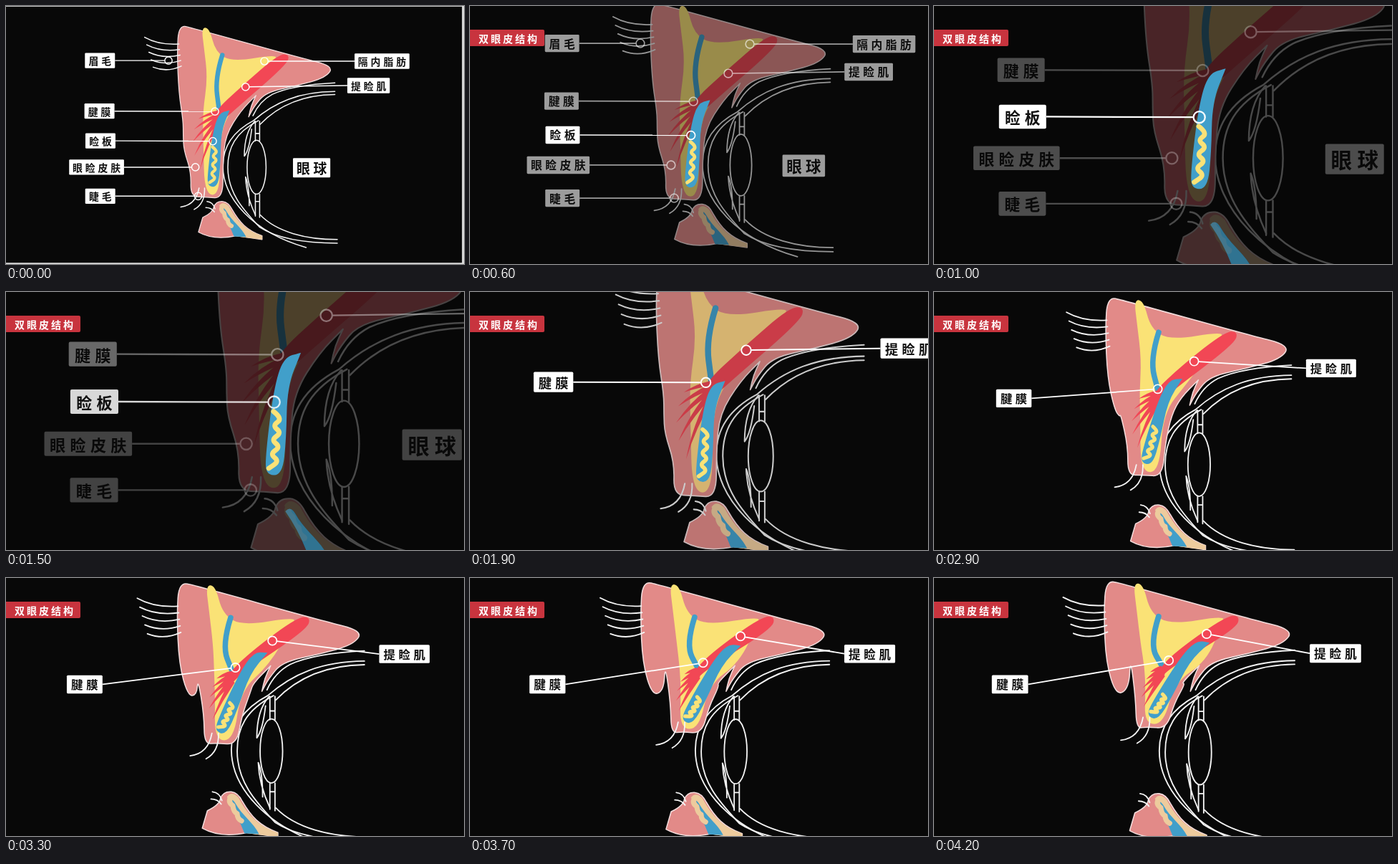
These frames come from a looping animation (640x360 px, 4.3 s). An HTML page:

```html
<!DOCTYPE html>
<html lang="zh">
<head>
<meta charset="utf-8">
<title>双眼皮结构</title>
<style>
  html, body { margin: 0; width: 100%; height: 100%; overflow: hidden; background: #ddd; }
  svg { display: block; width: 100vw; height: 100vh; }
  text { font-family: "Noto Sans CJK SC", "Noto Sans CJK", sans-serif; font-weight: 700; dominant-baseline: central; }
  .line { fill: none; stroke: #f4f4f4; stroke-width: 1.8; stroke-linecap: round; stroke-linejoin: round; }
  .skin { fill: #e28a88; stroke: #f3dede; stroke-width: 1.5; stroke-linejoin: round; }
  .blue { fill: #419fca; }
  .red { fill: #f24755; }
  .peach { fill: #edcb9d; }
  .round { fill: none; stroke-linecap: round; stroke-linejoin: round; }
</style>
</head>
<body>
<svg viewBox="0 0 640 360" preserveAspectRatio="none">
  <g id="world">
    <rect x="-70" y="-22" width="775.7" height="418" fill="#080808"/>

    <g class="line" transform="translate(1 0)">
      <path d="M497 102.5Q428 106 395 121Q374 132 363 156"/>
      <path d="M497 116.5C438 117 398 134 364 164C326 184 314 210 314 238C314 290 362 346 450 371"/>
      <path d="M497 121.5C446 122 406 138 375 170"/>
      <path d="M372 164C334 184 322 208 322 240C322 284 350 312 374 338C405 358 450 364 501 364"/>
      <path d="M375 318C402 346 450 358 501 358"/>
      <path d="M367 165V197M374 165V197M367 185H374M367 284V320M374 284V322M367 296H374"/>
      <path d="M366 165Q349 184 349 222Q357 212 361 178M351 256Q352 286 367 318M351 256Q357 270 357 303"/>
      <ellipse cx="369" cy="240" rx="15.5" ry="44"/>
    </g>

    <g transform="translate(2 0)">
      <path class="skin" d="M273 346L280 322Q297 314 298 305Q302 295 313 296Q322 297 328 309C340 330 352 343 377 352V358L335 352Q298 360 273 346Z"/>
      <path class="peach" d="M307 303Q313 294 323 304C337 331 353 344 377 352V358L335 353Z"/>
      <path id="lowBlue" class="blue" d="M308 309Q313 303 318 311C328 329 344 339 351 354L331 353Q322 329 308 309Z"/>
      <path class="round" stroke="#edcb9d" stroke-width="7" d="M312 304Q308 310 315 315Q316 324 321 326Q321 333 327 336"/>
      <path class="line" d="M287 296Q297 297 300 308M285 306Q294 306 299 313"/>
    </g>

    <path id="skin" class="skin"/>
    <path id="fat"/>
    <path id="band" class="round" stroke="#419fca" stroke-width="7.5"/>
    <path id="muscle" class="red"/>
    <path id="fibres" class="red"/>
    <path id="lashes" class="line" d="M276 274Q271 302 246 305M285 274Q286 299 268 309"/>
    <path id="brow" class="line"/>

    <rect id="dim" x="-70" y="-30" width="800" height="440" fill="#080808"/>
    <use id="glow" href="#lowBlue" x="2"/>
    <g id="plate">
      <path id="plateBody" class="blue"/>
      <path id="squiggle" class="round" stroke="#fbe277" stroke-width="5"/>
    </g>
    <g id="others"></g>
    <g id="tarsal"></g>
    <g id="pair"></g>
  </g>
  <g id="title">
    <rect x="-4" y="33" width="108" height="23" rx="2" fill="#c8343e"/>
    <text x="12" y="44.5" font-size="14" letter-spacing="3" fill="#fff">双眼皮结构</text>
  </g>
</svg>
<script>
const LOOP = 4300, STEP = 100;
const $ = id => document.getElementById(id);
const set = (el, attrs) => { for (const k in attrs) el.setAttribute(k, attrs[k]); return el; };
const add = (parent, tag, attrs) =>
  parent.appendChild(set(document.createElementNS('http://www.w3.org/2000/svg', tag), attrs));
const mix = (a, b, p) => a.map((v, i) => v + (b[i] - v) * p);
const rgb = c => `rgb(${c.map(Math.round)})`;
const linear = (t, from, to) => Math.min(1, Math.max(0, (t - from) / (to - from)));
const ramp = (t, from, to) => { const u = linear(t, from, to); return u * u * (3 - 2 * u); };

// Monotone curve through [time, value] keys
function track(keys) {
  const slope = i => (keys[i + 1][1] - keys[i][1]) / (keys[i + 1][0] - keys[i][0]);
  const tangent = i => {
    if (i === 0 || i === keys.length - 1) return 0;
    const a = slope(i - 1), b = slope(i);
    return a * b > 0 ? 2 * a * b / (a + b) : 0;
  };
  return t => {
    const i = keys.findIndex((k, n) => n < keys.length - 1 && t < keys[n + 1][0]);
    if (i < 0) return keys[keys.length - 1][1];
    const [t0, v0] = keys[i], [t1, v1] = keys[i + 1];
    const h = t1 - t0, u = (t - t0) / h, w = 1 - u;
    return v0 * w * w * (1 + 2 * u) + v1 * u * u * (1 + 2 * w)
      + h * u * w * (tangent(i) * w - tangent(i + 1) * u);
  };
}

// Quadratic spline; a repeated point makes a corner
function spline(pts, closed = true) {
  const n = pts.length, mid = i => mix(pts[i % n], pts[(i + 1) % n], 0.5);
  let d = 'M' + (closed ? mid(n - 1) : pts[0]);
  for (let i = closed ? 0 : 1; i < (closed ? n : n - 1); i++) d += 'Q' + pts[i] + ' ' + mid(i);
  return d + (closed ? 'Z' : 'L' + pts[n - 1]);
}

// Squashes tissue upwards as the lid opens, spreading it sideways from cx
const lifter = (p, cx, spread) => ([x, y]) => {
  const u = linear(y, 95, 285), bulge = Math.sin(Math.PI * Math.sqrt(u));
  return [x + p * (bulge * spread * (x - cx) + 10 * u), y - p * 83 * u];
};

const brow = [[243, 120], [240, 52], [243, 8], [266, 13], [440, 61], [496, 75], [483, 94], [436, 107],
  [385, 118], [366, 141], [357, 158], [357, 158], [361, 140], [369, 123], [369, 123], [345, 147]];
const lid = [[319, 188], [315, 235], [315, 291], [288, 289]];
const fat = [[280, 12], [293, 13], [303, 52], [330, 68], [403, 56], [400, 66], [335, 135], [309, 185],
  [311, 285], [285, 285], [283, 200], [282, 150], [290, 95], [284, 45]];
const muscle = [[406, 56], [424, 56], [419, 73], [330, 150], [304, 174], [297, 153], [350, 104]];
const band = [[314, 57], [302, 95], [309, 149]];
const plate = [[326, 147], [326, 147], [308, 152], [298, 185], [290, 250], [290, 272], [307, 272], [311, 235], [312, 182]];

function skinShape(p, lift) {
  const crease = (x, y, dx, dy) => [x + dx * p, y + dy * p];
  return [...brow, ...lid.map(lift), crease(262, 288, 22, -80), crease(263, 248, 20, -80),
    crease(251, 212, 25, -100), crease(250, 188, 24, -34), crease(250, 164, 7, 0)];
}

// A fan of tapered fibres below the muscle
function fibreShapes(lift) {
  let d = '';
  for (let i = 0; i < 5; i++) {
    const a = (162 - 12.5 * i) * Math.PI / 180, len = 36 + 12 * i, x = 309, y = 150 + 4 * i;
    const along = (k, bend) => lift([x + Math.cos(a + bend) * len * k, y + Math.sin(a + bend) * len * k]);
    const [bx, by] = lift([x, y]), [cx, cy] = along(0.5, 0.15), tip = along(1, 0);
    d += `M${bx - 2.5} ${by - 2.5}Q${cx - 2} ${cy - 2} ${tip}Q${cx + 2} ${cy + 2} ${bx + 2.5} ${by + 2.5}Z`;
  }
  return d;
}

function wave(p) {
  return Array.from({ length: 9 }, (_, i) =>
    [302 - i * 0.6 + (i % 2 ? 6 : -4), 265 - (58 - 30 * p) * (1 - i / 8)]);
}

function hairs() {
  let d = '';
  for (let i = 0; i < 5; i++) {
    const x = 187 + 3.5 * i, y = 28 + 12.2 * i;
    d += `M${x} ${y}Q${x + 23} ${y + 13 - i} ${243 + i} ${39 + 9 * i}`;
  }
  return d;
}

function label(group, text, x, y, from, to = from, size = 16.2) {
  const g = add($(group), 'g', {}), n = text.length, big = size > 20;
  const w = big ? 61 : n * 20.3 + 8.5, h = big ? 31.5 : 25, gap = big ? 5.5 : 4.6;
  const line = from && add(g, 'line', { stroke: '#fff', 'stroke-width': 1.7 });
  const ring = from && add(g, 'circle', { r: 6, fill: 'none', stroke: '#fff', 'stroke-width': 1.7 });
  add(g, 'rect', { x: x - w / 2, y: y - h / 2, width: w, height: h, rx: 1.5, fill: '#fff' });
  add(g, 'text', { x: x + gap / 2, y, 'font-size': size, 'letter-spacing': gap, 'text-anchor': 'middle', fill: '#111' })
    .textContent = text;
  return p => {
    if (!from) return;
    const [cx, cy] = mix(from, to, p), x1 = x + Math.sign(cx - x) * w / 2;
    const k = 6 / Math.hypot(cx - x1, cy - y);
    set(line, { x1, y1: y, x2: cx + (x1 - cx) * k, y2: cy + (y - cy) * k });
    set(ring, { cx, cy });
  };
}
const labels = [
  label('others', '眉毛', 114, 66, [226, 66]),
  label('others', '眼睑皮肤', 108.5, 240, [270, 240]),
  label('others', '睫毛', 114.5, 287.3, [274.5, 287.3]),
  label('others', '隔内脂肪', 575, 67, [382.8, 67]),
  label('others', '眼球', 460, 241, null, null, 22),
  label('tarsal', '睑板', 114.8, 197, [298.5, 197.5]),
  label('pair', '腱膜', 113.2, 148.5, [302, 149], [327.8, 116.3]),
  label('pair', '提睑肌', 553, 106.8, [352, 109], [379, 80.5])
];

// Time, scale, x, y
const shots = [
  [0, 0.855, 33.8, 19.7], [600, 0.976, 17.4, -12.3], [1000, 1.344, -30.5, -110.3],
  [1250, 1.367, -33.5, -116.3], [1500, 1.367, -33.5, -116.3], [1900, 1.128, -11.1, -41.8], [2400, 1, 0, 0]
];
const camera = [1, 2, 3].map(col => track(shots.map(s => [s[0], s[col]])));

function draw(t) {
  const p = 1 - (1 - linear(t, 2500, 4200)) ** 2;
  const soft = lifter(p, 265, 0.6), taut = lifter(p, 325, -0.5);
  const [s, x, y] = camera.map(f => f(t));
  const push = 1 + 0.034 * linear(t, 2500, 4200);
  const back = ramp(t, 1500, 1900), focus = ramp(t, 600, 1000);
  const shade = 0.4 * ramp(t, 200, 600) + 0.32 * focus - 0.55 * back - 0.17 * ramp(t, 1900, 2200);
  const hide = 1 - ramp(t, 1400, 1800), warm = focus - ramp(t, 1900, 2400);

  set($('world'), {
    transform: `translate(320 153) scale(${push}) translate(-320 -153) matrix(${s} 0 0 ${s} ${x} ${y})`
  });
  set($('skin'), {
    d: spline(skinShape(p, soft)),
    style: `fill:${rgb(mix([226, 138, 136], [245, 112, 122], focus - back))}`
  });
  set($('fat'), { d: spline(fat.map(soft)), fill: rgb(mix([250, 226, 118], [255, 214, 134], warm)) });
  set($('band'), { d: spline(band.map(taut), false) });
  set($('muscle'), { d: spline(muscle.map(taut)) });
  set($('fibres'), { d: fibreShapes(taut) });
  set($('lashes'), { transform: `translate(${17 * p} ${-81 * p})` });
  set($('brow'), { transform: `translate(${-2 * p} ${3 * p})` });
  set($('plate'), { transform: `rotate(${25 * p} 478 248)` });
  set($('squiggle'), { d: spline(wave(p), false) });
  labels.forEach(move => move(p));

  set($('dim'), { opacity: shade });
  set($('glow'), { opacity: 0.6 * (focus - back) });
  set($('others'), { opacity: (1 - shade) * hide });
  set($('tarsal'), { opacity: hide });
  set($('pair'), { opacity: 1 - shade * hide });
  set($('title'), { transform: `translate(${-108 * (1 - ramp(t, 100, 500))} 0)` });
}

set($('brow'), { d: hairs() });
set($('plateBody'), { d: spline(plate) });

function tick() {
  draw(Math.floor(performance.now() % LOOP / STEP) * STEP);
  requestAnimationFrame(tick);
}
tick();
</script>
</body>
</html>
```
